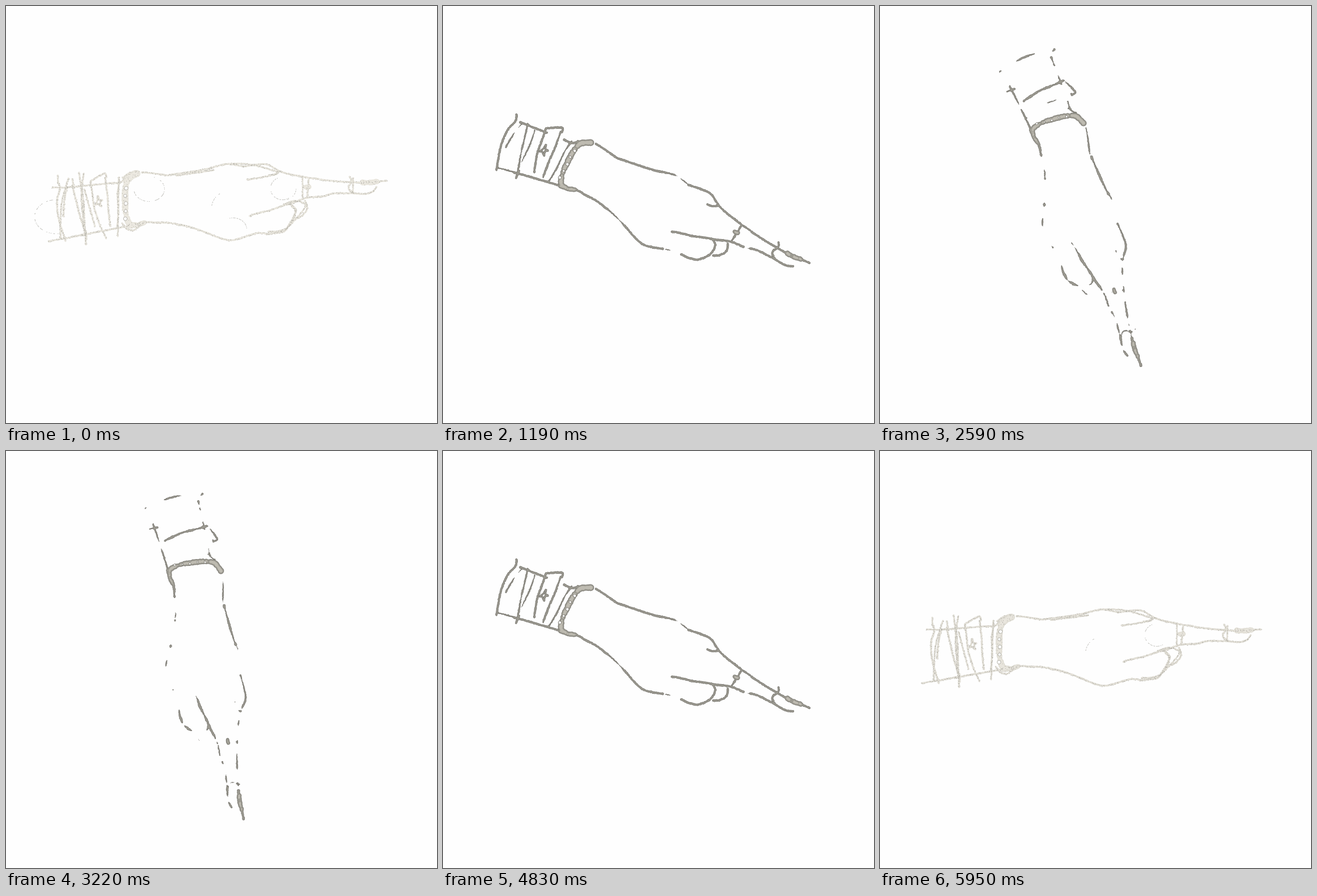
Animation of 760x737 px, one loop 6.02 s. Source, as an HTML page with a canvas:

```html
<!DOCTYPE html>
<html lang="en">
<head>
<meta charset="utf-8">
<title>Pointing hand</title>
<style>
html, body { margin: 0; width: 100%; height: 100%; overflow: hidden; background: #fefefe; }
canvas { display: block; }
</style>
</head>
<body>
<canvas id="stage" width="760" height="737"></canvas>
<script>
const ctx = document.getElementById('stage').getContext('2d');
const STEP = 70, COUNT = 86, HALF = 43;
const PAPER = '#fefefe';

function seeded(seed) {
  return () => {
    seed = (seed + 0x6D2B79F5) | 0;
    let q = Math.imul(seed ^ seed >>> 15, 1 | seed);
    q = q + Math.imul(q ^ q >>> 7, 61 | q) ^ q;
    return ((q ^ q >>> 14) >>> 0) / 4294967296;
  };
}
const rnd = seeded(11);

// Smooth random values between -1 and 1 along a line
function waver(spacing) {
  let from = rnd() * 2 - 1, to = rnd() * 2 - 1, at = 0;
  return step => {
    at += step / spacing;
    if (at >= 1) { at -= 1; from = to; to = rnd() * 2 - 1; }
    return from + (to - from) * at * at * (3 - 2 * at);
  };
}

const spline = (a, b, c, d, u) =>
  b + u / 2 * (c - a + u * (2 * a - 5 * b + 4 * c - d + u * (3 * (b - c) + d - a)));

// A pen line through a few points; life is the step at which it wears away on average
const strokes = [];
function ink(life, xy, cap = 0) {
  const dots = [], wear = waver(11), gap = 1.3;
  const point = i => {
    const k = Math.max(0, Math.min(xy.length / 2 - 1, i)) * 2;
    return [xy[k], xy[k + 1]];
  };
  for (let i = 0; i < xy.length / 2 - 1; i++) {
    const [a, b, c, d] = [point(i - 1), point(i), point(i + 1), point(i + 2)];
    const n = Math.ceil(Math.hypot(c[0] - b[0], c[1] - b[1]) / gap);
    for (let j = 0; j < n; j++) {
      dots.push({
        x: spline(a[0], b[0], c[0], d[0], j / n) + (rnd() - .5) * .8,
        y: spline(a[1], b[1], c[1], d[1], j / n) + (rnd() - .5) * .8,
        life: life * (1 + .32 * wear(gap)),
        grain: rnd(), side: rnd() - .5
      });
    }
  }
  strokes.push({ life, cap, dots });
}

// Back of the hand and top of the index finger
ink(39, [240,294, 262,296, 283,299, 294,298]);
ink(56, [292,298, 320,294, 345,290, 364,286]);
ink(34, [362,286, 376,282, 390,279]);
ink(18, [390,279, 405,281, 420,284]);
ink(46, [418,284, 437,281, 460,280, 475,288, 482,292]);
ink(32, [464,299, 473,298, 482,292]);
ink(38, [482,292, 499,297, 525,302, 552,306]);
ink(43, [555,307, 585,310, 600,311, 620,312]);
// Nail and tip
ink(110, [628,312, 642,312, 655,310], 9);
ink(54, [620,312, 630,312, 660,310, 671,309]);
// Underside of the index finger
ink(52, [430,371, 441,367, 466,361, 485,354, 502,349]);
ink(44, [500,350, 508,347, 531,339, 555,337]);
ink(14, [555,337, 566,335]);
ink(40, [566,334, 583,331, 616,331]);
ink(42, [612,331, 635,332, 648,327]);
// Rings
ink(36, [606,302, 609,309, 604,322, 613,331]);
ink(70, [528,320, 535,320], 8);
ink(32, [534,304, 533,318, 531,338]);
// Curled finger and the one behind it
ink(48, [463,399, 480,398, 494,393, 508,376, 509,358, 500,350]);
ink(40, [514,375, 524,369, 531,357, 527,344]);
// Palm edge
ink(60, [232,386, 245,382, 266,383]);
ink(39, [266,383, 285,383, 309,387]);
ink(25, [309,387, 329,392, 352,400]);
ink(40, [352,400, 372,408, 393,414, 412,411, 430,405]);
ink(18, [430,405, 445,401, 462,403]);
// Bracelet
ink(130, [231,296, 216,305, 211,320, 210,345, 211,365, 217,384, 230,387], 11);
ink(70, [218,389, 232,387, 244,383], 8);
// Sleeve folds
ink(44, [92,312, 95,324, 90,345, 93,376, 105,416]);
ink(22, [108,320, 103,343, 101,372]);
ink(26, [117,318, 124,346, 129,366, 141,405]);
ink(20, [133,322, 137,350, 138,390]);
ink(54, [149,312, 152,330, 156,358, 166,389]);
ink(32, [175,304, 179,336, 180,356, 184,390]);
ink(40, [149,310, 155,306, 174,296, 177,304]);
ink(26, [200,310, 197,330, 198,366, 196,392]);
// Sleeve edges and the star on the cuff
ink(44, [104,321, 125,319, 155,316]);
ink(36, [186,313, 202,312, 210,304]);
ink(24, [104,411, 126,406, 136,404]);
ink(44, [134,405, 158,400, 194,393, 222,388]);
ink(40, [141,398, 142,413]);
ink(26, [158,351, 161,345, 162,336, 165,343, 170,343, 166,347, 168,354, 162,350, 158,351]);

// Light sketch lines that fade first
[
  [300,300, 325,296, 367,290], [425,307, 450,303, 478,297], [395,279, 430,280, 480,293],
  [490,351, 505,345, 522,347, 526,358, 490,399], [460,403, 478,401, 490,399], [504,355, 511,363, 494,396],
  [523,302, 523,340], [612,304, 612,331], [648,327, 654,319],
  [206,304, 216,296, 231,292, 231,301], [205,384, 214,394, 225,396, 238,387],
  [91,300, 92,314], [110,305, 98,350, 96,412], [117,306, 120,322], [129,295, 136,350, 141,422],
  [137,296, 133,340, 139,402], [138,324, 157,390], [166,389, 177,411], [199,303, 197,408],
  [82,321, 104,321], [155,316, 186,313], [75,416, 105,410]
].forEach(xy => ink(9, xy));

// Ink survives longer where two lines meet
const firm = strokes.filter(s => s.life > 24);
for (const s of firm) {
  const others = firm.filter(o => o !== s).flatMap(o => o.dots);
  for (const d of s.dots) {
    if (others.some(o => Math.hypot(o.x - d.x, o.y - d.y) < 2.5)) d.life += 10;
  }
}

// Dotted construction circles: centre, radii, angles, life
const specks = [];
function arc(x, y, rx, ry, from, to, life) {
  for (let q = from; q < to; q += 90 / rx) {
    const r = q * Math.PI / 180;
    if (rnd() < .45) specks.push({ x: x + rx * Math.cos(r), y: y + ry * Math.sin(r), life });
  }
}
arc(252, 323, 27, 22, -70, 170, 1);
arc(487, 322, 21, 20, 60, 250, 7);
arc(490, 322, 21, 20, 0, 90, 1);
arc(88, 372, 38, 30, 85, 275, 1);
arc(400, 394, 24, 20, 230, 360, 1);
arc(392, 357, 30, 30, 190, 240, 2);

const cubic = (t, a, b, c) => t * (a + t * (b + t * c));
const mix = (a, b, u) => `rgb(${a.map((v, i) => Math.round(v + (b[i] - v) * u))})`;

function dabs(list, color) {
  ctx.fillStyle = color;
  ctx.beginPath();
  for (const [d, r] of list) {
    ctx.moveTo(d.x + r, d.y);
    ctx.arc(d.x, d.y, r, 0, 7);
  }
  ctx.fill();
}

// The hand speeds up as it swings down, and its pivot slips a little
function place(t) {
  ctx.setTransform(1, 0, 0, 1, 0, 0);
  ctx.fillStyle = PAPER;
  ctx.fillRect(0, 0, 760, 737);
  ctx.translate(355 + cubic(t, .294, -.0299, .0006), 333 + cubic(t, .0676, -.02084, .000585));
  ctx.rotate(cubic(t, 1.1085, .03236, -.000203) * Math.PI / 180);
  ctx.translate(-355, -333);
}

function draw(t) {
  const age = Math.min(1, t / 12);
  const rim = [], body = [], core = [], dust = [];
  place(t);

  for (const s of strokes) {
    const cap = s.cap || 3.3 + t / 25;
    for (const d of s.dots) {
      if (d.life <= t) continue;
      const w = Math.min(cap, .8 + .8 * Math.sqrt(d.life - t)) * (.85 + .3 * d.grain);
      const inner = w / 2 - .6 - .3 * age;
      rim.push([d, w / 2]);
      if (inner > .2) body.push([d, inner]);
      if (w > 6 && d.grain > .4) core.push([d, w / 2 - 2.6]);
      if (d.grain > .3 + .7 * age) dust.push([d, w]);
    }
  }
  dabs(rim, mix([226, 223, 214], [124, 122, 115], age));
  dabs(body, mix([234, 231, 222], [156, 154, 145], age));
  dabs(core, mix([236, 233, 225], [190, 187, 177], age));

  ctx.fillStyle = '#96948d';
  for (const [d, w] of dust) ctx.fillRect(d.x + d.side * w - .4, d.y + (d.grain - .65) * w * 1.4 - .4, .8, .8);
  ctx.fillStyle = '#aaa9a2';
  for (const d of specks) {
    if (d.life > t) ctx.fillRect(d.x, d.y, 1, 1);
  }

  // Gaps between the bracelet's links
  ctx.fillStyle = PAPER;
  ctx.strokeStyle = mix([175, 173, 165], [128, 126, 118], age);
  ctx.lineWidth = .9;
  for (let i = 0; i < 5; i++) {
    ctx.beginPath();
    ctx.arc(211 + Math.cos(i * 2.6), 322 + i * 13.5, 3.3 - .035 * t - (i % 2) * .5, 0, 7);
    ctx.fill();
    ctx.stroke();
  }
}

const start = performance.now();
let last = -1;
function tick() {
  const n = Math.floor((performance.now() - start) / STEP) % COUNT;
  if (n !== last) {
    last = n;
    draw(n <= HALF ? n : COUNT - n);
  }
  requestAnimationFrame(tick);
}
tick();
</script>
</body>
</html>
```
